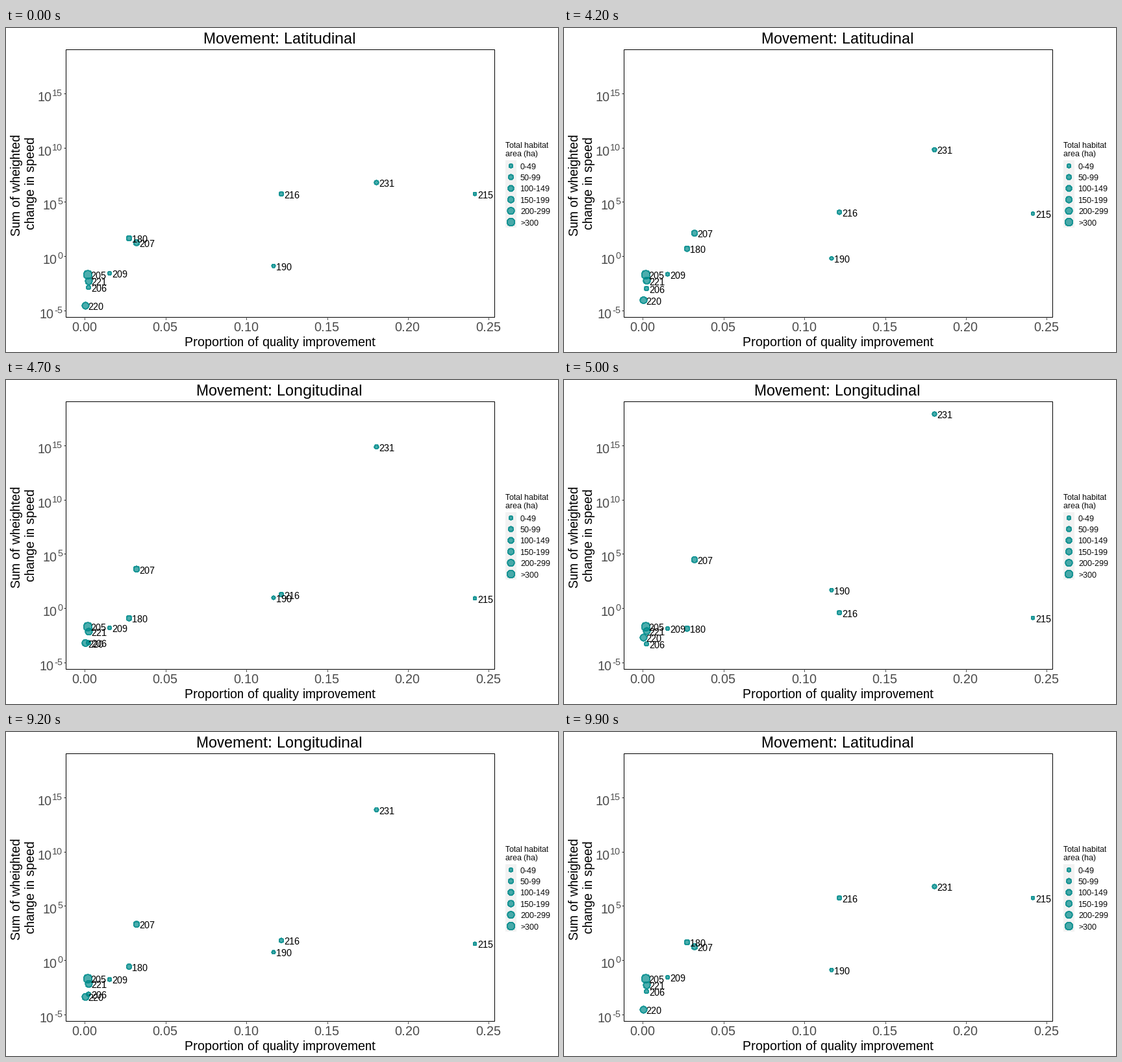
Write a matplotlib script that moves like this. It is 850 px wide and 500 px high and loops after 10000 ms.

```python
import matplotlib.pyplot as plt
from matplotlib.animation import FuncAnimation
from matplotlib.patches import Circle, Rectangle

W, H, DPI = 850, 500, 100
FRAMES, INTERVAL = 100, 100
STEPS = 11            # length of one transition, in frames
OUT, BACK = 39, 88    # last resting frame before each transition
TITLE_STEP = 7        # step at which the heading changes
PX = 72 / DPI         # one pixel in points
TEAL = (0, 139 / 255, 139 / 255, 0.7)
GREY, TICK = "#4D4D4D", "#333333"

# site, x, latitudinal y, longitudinal y, radius (pixels)
SITES = [
    ("205", 126, 380.7, 380.7, 7.0),
    ("221", 127.5, 390.8, 387.5, 5.6),
    ("220", 122.5, 428.5, 397.5, 5.6),
    ("207", 201, 331.3, 277.2, 5.0),
    ("180", 189.5, 324.5, 383.7, 4.5),
    ("206", 127, 400.2, 407.2, 3.7),
    ("216", 424, 256.2, 359.2, 3.8),
    ("231", 570.5, 238.5, 52.5, 3.6),
    ("209", 159.5, 378.7, 383.7, 3.3),
    ("190", 412, 367.2, 324.2, 3.1),
    ("215", 722, 256.2, 367.2, 3.0),
]
KEYS = [("0-49", 3.4), ("50-99", 4.2), ("100-149", 4.8),
        ("150-199", 5.3), ("200-299", 5.8), (">300", 6.4)]

# whole-pixel glyph widths
plt.rcParams.update({"font.family": "Liberation Sans",
                     "text.hinting": "native", "text.hinting_factor": 1})
fig = plt.figure(figsize=(W / DPI, H / DPI), dpi=DPI, facecolor="white")
ax = fig.add_axes([0, 0, 1, 1])
ax.set_xlim(0, W)
ax.set_ylim(H, 0)
ax.axis("off")


def text(x, y, s, px, color="black", **kw):
    return ax.text(x, y, s, fontsize=px * PX, color=color,
                   va="baseline", zorder=5, **kw)


def line(xs, ys, color):
    ax.plot(xs, ys, color=color, lw=PX, solid_capstyle="butt")


def dot(x, y, r):
    return ax.add_patch(Circle((x, y), r - 0.5, fc=TEAL, ec=TEAL, lw=PX,
                               antialiased=False, zorder=3))


def draw_axes():
    ax.add_patch(Rectangle((92.5, 33.5), 660, 413, fill=False, ec="black",
                           lw=PX, snap=False, zorder=2))
    for i in range(6):
        x = 121.5 + 124.4 * i
        line([x, x], [447, 450], TICK)
        text(x - 1, 468, f"{0.05 * i:.2f}", 20, GREY, ha="center")
    for i, (power, width) in enumerate(
            [("15", 16), ("10", 16), ("5", 8), ("0", 8), ("-5", 13)]):
        y = 101 + 83.7 * i
        line([89, 92], [y, y], TICK)
        text(87 - width, y + 12, "10", 20, GREY, ha="right")
        text(87, y + 4, power, 14, GREY, ha="right")
    text(422, 491, "Proportion of quality improvement", 20, ha="center")
    for x, y, s in [(22, 242.5, "Sum of wheighted"),
                    (44.5, 239.5, "change in speed")]:
        text(x, y, s, 20, rotation=90, ha="center", rotation_mode="anchor")


def draw_legend():
    text(769, 185, "Total habitat", 12)
    text(769, 198, "area (ha)", 12)
    ax.add_patch(Rectangle((769, 204), 17, 104, fc="#F2F2F2", lw=0))
    for i, (label, r) in enumerate(KEYS):
        y = 212.8 + 17.35 * i
        dot(777.5, y, r)
        text(792, y + 5, label, 12)


draw_axes()
draw_legend()
title = text(421.5, 24, "", 24, ha="center")
dots = [dot(x, lat, r) for _, x, lat, _, r in SITES]
labels = [text(x + 4.1, lat, name, 14.5) for name, x, lat, _, _ in SITES]


def clamp(step):
    return min(max(step, 0), STEPS)


def update(k):
    p = (clamp(k - OUT) - clamp(k - BACK)) / STEPS
    along = OUT + TITLE_STEP <= k < BACK + TITLE_STEP
    title.set_text("Movement: " + ("Longitudinal" if along else "Latitudinal"))
    for (_, x, lat, lon, _), d, label in zip(SITES, dots, labels):
        y = lat + (lon - lat) * p
        d.center = x, y
        label.set_y(y + 6.6)
    return [title, *dots, *labels]


anim = FuncAnimation(fig, update, frames=FRAMES, interval=INTERVAL,
                     init_func=lambda: update(0), repeat=True,
                     repeat_delay=0, blit=False)
plt.show()
```
